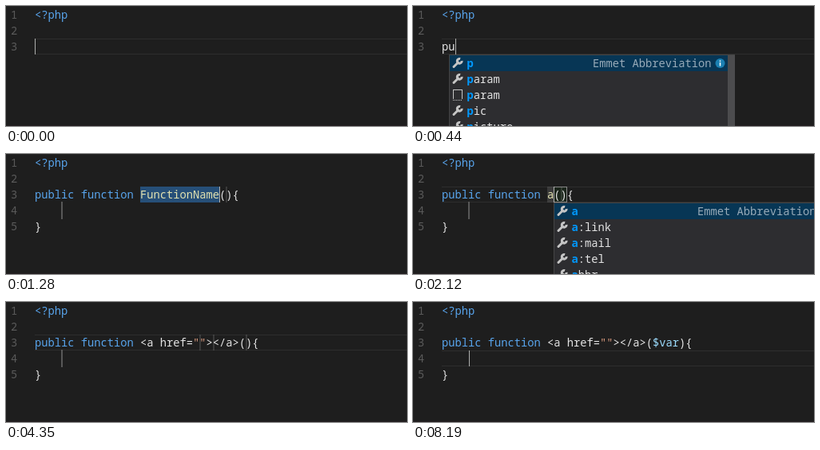
Recreate the animation shown at these times as an HTML page with a canvas. Size 502x151 px, loop 8330 ms.

```html
<!DOCTYPE html>
<html lang="en">
<head>
<meta charset="utf-8">
<title>Editor snippet</title>
<style>
  html, body { margin: 0; width: 100%; height: 100%; overflow: hidden; background: #1e1e1e; }
  canvas { display: block; }
</style>
</head>
<body>
<canvas id="stage" width="502" height="151"></canvas>
<script>
const ctx = document.getElementById('stage').getContext('2d');
const LOOP = 8330, W = 502, H = 151;
const LEFT = 36, CELL = 8.25, LINE = 20;
const FONT = '13.75px "Noto Sans Mono", monospace';
const BLUE = '#58a4ec', PLAIN = '#e4e4e4', NAME = '#e2e2b0', STRING = '#d6977c',
      VARIABLE = '#9cdcfe', MATCH = '#0097fb', TABSTOP = 'rgba(124,124,124,0.3)';

const colX = col => LEFT + col * CELL;
const lineY = line => 1 + (line - 1) * LINE;

function rect(x, y, w, h, color) {
  ctx.fillStyle = color;
  ctx.fillRect(x, y, w, h);
}

function text(str, x, y, color, weight = 500) {
  ctx.font = weight + ' ' + FONT;
  ctx.fillStyle = color;
  ctx.fillText(str, x, y);
}

function frame(x, y, w, h, color) {
  ctx.strokeStyle = color;
  ctx.lineWidth = 1;
  ctx.strokeRect(x + 0.5, y + 0.5, w - 1, h - 1);
}

// Runs are [text, color] pairs laid out one after the other.
function code(runs, line) {
  let col = 0;
  for (const [str, color] of runs) {
    text(str, colX(col), lineY(line) + 15, color);
    col += str.length;
  }
}

const menus = {
  p: ['p', 'param', '#param', 'pic', 'picture'],
  pu: ['#pubf', '#pubsf'],
  pub: ['#pubf', '#pubsf'],
  pubf: ['#pubf', '#pubsf'],
  a: ['a', 'a:link', 'a:mail', 'a:tel', 'abbr']
};

function wrench(x, y) {
  ctx.strokeStyle = '#c5c5c5';
  ctx.lineCap = 'round';
  ctx.lineWidth = 3;
  ctx.beginPath();
  ctx.moveTo(x + 2, y + 11.5);
  ctx.lineTo(x + 7.5, y + 6);
  ctx.stroke();
  ctx.lineCap = 'butt';
  ctx.beginPath();
  ctx.arc(x + 9.2, y + 4.3, 2.9, -0.1, Math.PI * 1.6);
  ctx.stroke();
}

function snippetIcon(x, y) {
  const c = '#c5c5c5';
  rect(x + 1, y, 12, 1, c);
  rect(x + 1, y, 1, 12, c);
  rect(x + 12, y, 1, 12, c);
  for (let i = 1; i < 13; i += 2) rect(x + i, y + 13, 1, 1, c);
}

function infoIcon(x, y) {
  ctx.fillStyle = '#1b80b2';
  ctx.beginPath();
  ctx.arc(x, y, 6, 0, Math.PI * 2);
  ctx.fill();
  rect(x - 0.75, y - 3.5, 1.5, 1.5, '#fff');
  rect(x - 0.75, y - 1, 1.5, 4.5, '#fff');
}

function menu(word, x) {
  const items = menus[word], w = 358, top = 61, h = items.length * LINE;
  rect(x, top, w, h, '#2d2d30');
  rect(x + 1, top + 1, w - 2, LINE, '#073655');
  items.forEach((item, row) => {
    const snippet = item[0] === '#', label = snippet ? item.slice(1) : item;
    const y = top + row * LINE;
    (snippet ? snippetIcon : wrench)(x + 4, y + 4);
    let hit = 0;
    [...label].forEach((ch, i) => {
      const on = ch === word[hit];
      if (on) hit++;
      text(ch, x + 22.5 + i * CELL, y + 16, on ? MATCH : PLAIN, on ? 700 : 500);
    });
  });
  const snippet = items[0][0] === '#';
  text(snippet ? 'Creates a public function. (PHP…' : 'Emmet Abbreviation',
    x + (snippet ? 67 : 180), top + 16, '#98abb9');
  infoIcon(x + 339.5, top + 11);
  frame(x, top, w, h, '#454545');
  if (top + h > H) rect(x + w - 9, top + 1, 9, h, '#4c4c4e');
}

const head = ['public function ', BLUE];
const anchor = [head, ['<a href=', PLAIN], ['""', STRING], ['></a>(', PLAIN]];
const typed = str => [[str, PLAIN]];
const linked = (arg = '', color = PLAIN) => [...anchor, [arg, color], ['){', PLAIN]];
const named = [head, ['FunctionName', NAME], ['(){', PLAIN]];
const short = [head, ['a', NAME], ['(){', PLAIN]];

// stops: [column, length] of the tab stops; pair: columns of the matched brackets.
const selected = { runs: named, body: true, select: true, stops: [[29, 0]] };
const naming = { runs: short, body: true, stops: [[16, 1], [18, 0]], pair: [17, 18], menu: ['a', 176] };
const link = { runs: linked(), body: true, stops: [[25, 0], [27, 0], [32, 0]] };
const args = { ...link, pair: [31, 32] };
const arg = (str, color) => ({
  runs: linked(str, color), body: true,
  stops: [[25, 0], [27, 0], [32, str.length]], pair: [31, 32 + str.length]
});
const done = arg('$var', VARIABLE);

const steps = [
  [0, { runs: [], caret: 36 }],
  [80, { runs: typed('p'), caret: 45 }],
  [140, { runs: typed('p'), caret: 45, menu: ['p', 45] }],
  [380, { runs: typed('pu'), caret: 53, menu: ['p', 45] }],
  [450, { runs: typed('pu'), caret: 53, menu: ['pu', 53] }],
  [520, { runs: typed('pub'), caret: 61, menu: ['pu', 53] }],
  [590, { runs: typed('pub'), caret: 61, menu: ['pub', 61] }],
  [660, { runs: typed('pubf'), caret: 70, menu: ['pubf', 70] }],
  [1120, { runs: typed('pubf'), menu: ['pubf', 70] }],
  [1200, { ...selected, runs: typed('public function FunctionName(){'), caret: 267 }],
  [1280, { ...selected, caret: 267 }],
  [1740, selected],
  [2120, { ...naming, caret: 176 }],
  [2580, naming],
  [2890, { ...link, caret: 242 }],
  [3350, link],
  [3810, { ...link, caret: 242 }],
  [4350, link],
  [4810, { ...link, caret: 242 }],
  [5290, { ...link, caret: 259 }],
  [5750, link],
  [5810, { ...args, caret: 300 }],
  [6290, args],
  [6520, { ...arg('$'), caret: 309 }],
  [6980, arg('$')],
  [7520, { ...arg('$'), caret: 309 }],
  [7750, { ...arg('$v', VARIABLE), caret: 317 }],
  [7810, { ...arg('$va', VARIABLE), caret: 325 }],
  [7970, { ...done, caret: 333 }],
  [8110, { ...done, pair: null, caret: 70, line: 4 }],
  [8190, { runs: done.runs, body: true, bare: true, caret: 70, line: 4 }]
];

// Neighbouring brackets share one box.
function brackets([open, close]) {
  const boxes = close === open + 1 ? [[open, 2]] : [[open, 1], [close, 1]];
  for (const [col, len] of boxes) {
    const x = Math.round(colX(col)), w = Math.round(len * CELL);
    rect(x, lineY(3), w, LINE, 'rgba(0,100,0,0.1)');
    frame(x, lineY(3), w, LINE, '#888');
  }
}

function draw(s) {
  const line = s.line || 3, y = lineY(line), y3 = lineY(3);
  rect(0, 0, W, H, '#1e1e1e');
  rect(0, 0, W, 1, '#232323');
  rect(0, H - 1, W, 1, '#241e20');

  if (s.select) {
    rect(colX(16), y3, 12 * CELL, LINE, '#264f78');
  } else {
    rect(LEFT, y, W - LEFT, 1, '#2e2e2e');
    rect(LEFT, y + LINE - 1, W - LEFT, 1, '#2e2e2e');
  }

  for (const [col, len] of s.stops || [])
    rect(Math.round(colX(col)), y3, Math.max(2, len * CELL), LINE, TABSTOP);
  if (s.body && !s.bare) rect(69, 60, 2, 22, '#585858');
  if (s.pair) brackets(s.pair);

  for (let n = 1; n <= (s.body ? 5 : 3); n++)
    text(String(n), 6, lineY(n) + 15, '#5a5a5a', 400);
  code([['<?php', BLUE]], 1);
  code(s.runs, 3);
  if (s.body) code(typed('}'), 5);

  if (s.caret) rect(s.caret, y, 1, LINE, '#aeafad');
  if (s.menu) menu(...s.menu);
}

function tick() {
  const t = performance.now() % LOOP;
  draw(steps.findLast(([start]) => start <= t)[1]);
  requestAnimationFrame(tick);
}
tick();
</script>
</body>
</html>
```
